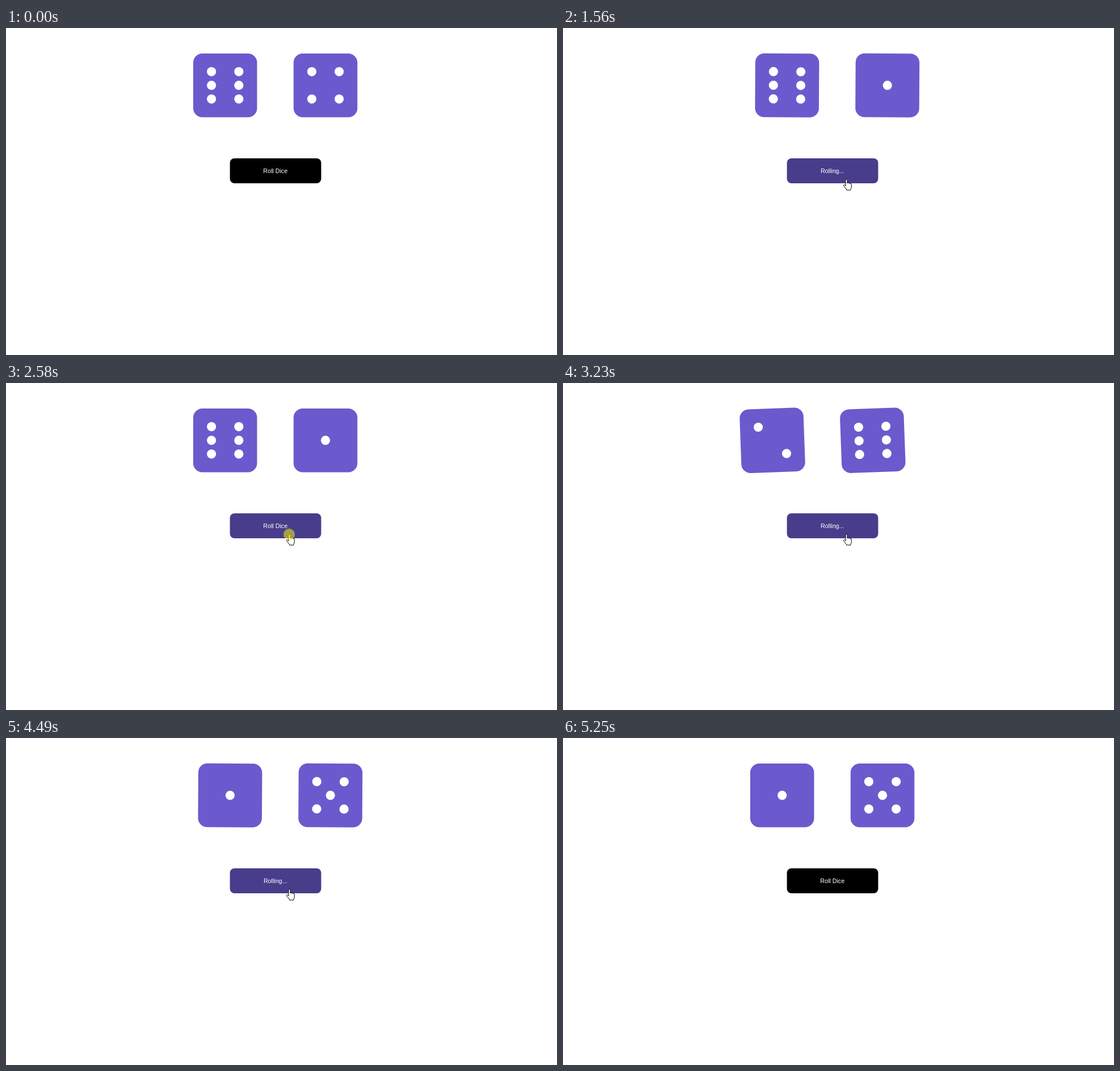
An HTML page that plays this animation: 971x577 px, repeating every 5.81 s.

```html
<!DOCTYPE html>
<html lang="en">
<head>
<meta charset="utf-8">
<title>Roll Dice</title>
<style>
  html, body { margin: 0; height: 100%; overflow: hidden; background: #fff; }
  svg { display: block; width: 971px; height: 577px; }
  text { font: 10.7px "Liberation Sans", Arial, sans-serif; fill: #fff; text-anchor: middle; }
  .die { fill: #6a5acd; }
  .pip { fill: #fff; }
  #cursor path { fill: #fff; stroke: #000; stroke-linejoin: round; }
</style>
</head>
<body>
<svg viewBox="0 0 971 577">
  <g id="dice"></g>
  <rect id="button" x="394.6" y="230" width="160.8" height="44" rx="8"/>
  <text id="label" x="474.7" y="255.7"></text>
  <g id="cursor">
    <path id="arrow" d="M0 0V16l3.7-3.6 2.6 6.1 2.3-1-2.6-6H11z"/>
    <path id="hand" d="M-1 11V1.5a1.5 1.5 0 0 1 3 0V7q0-1 1.3-1t1.3 1.2q.2-1 1.3-.8t1.2 1.3q2-.6 2.2 1.3V13q0 2.5-1.5 4.5V19H.5v-1.2L-4.5 11.5q-.6-1.8 1-1.8 1.2 0 2.5 2z"/>
  </g>
  <circle id="press" cx="499" cy="267" r="10" fill="#ff0" fill-opacity=".5"/>
</svg>
<script>
const LOOP = 5810, STEP = 65, WOBBLE = 1100, ROLL_STEPS = 12;
const CENTERS = [386.2, 563], CENTER_Y = 101.2, SLOT = 176.8, SIZE = 112.5, PIP_GAP = 24.1;

// Cells of a 3 x 3 grid that carry a pip
const FACES = { 1: [4], 2: [0, 8], 4: [0, 2, 6, 8], 5: [0, 2, 4, 6, 8], 6: [0, 2, 3, 5, 6, 8] };
const ROLLS = [
  { press: 1180, start: 1370, faces: [6, 1] },
  { press: 2580, start: 2830, faces: [2, 6] },
  { press: 4100, start: 4290, faces: [1, 5] }
];
// Progress, shift in slot widths, degrees
const KEYS = [[0, 0, 0], [.15, -.25, -5], [.3, .2, 3], [.45, -.15, -3], [.6, .1, 2], [.75, -.05, -1], [1, 0, 0]];

const $ = id => document.getElementById(id);
const show = (node, on) => node.setAttribute('visibility', on ? 'visible' : 'hidden');
const mix = (a, b, p) => a + (b - a) * p;
const stepsSince = (t, start) => Math.floor((t - start + 5) / STEP);

function add(parent, tag, attrs) {
  const node = document.createElementNS('http://www.w3.org/2000/svg', tag);
  for (const name in attrs) node.setAttribute(name, attrs[name]);
  return parent.appendChild(node);
}

const dice = CENTERS.map(() => {
  const group = add($('dice'), 'g', {});
  add(group, 'rect', { class: 'die', x: -SIZE / 2, y: -SIZE / 2, width: SIZE, height: SIZE, rx: 16 });
  const pips = Array.from({ length: 9 }, (_, i) => add(group, 'circle', {
    class: 'pip', r: 8.1, cx: (i % 3 - 1) * PIP_GAP, cy: (Math.floor(i / 3) - 1) * PIP_GAP
  }));
  return { group, pips };
});

// The CSS "ease" curve
function ease(x) {
  let low = 0, high = 1, u = .5;
  for (let i = 0; i < 20; i++) {
    if (.75 * u * (1 - u) + u ** 3 < x) low = u; else high = u;
    u = (low + high) / 2;
  }
  return .3 * u * (1 - u) ** 2 + 3 * u * u * (1 - u) + u ** 3;
}

function wobble(p) {
  const i = KEYS.findIndex(key => key[0] > p);
  const a = KEYS[i - 1], b = KEYS[i];
  const e = ease((p - a[0]) / (b[0] - a[0]));
  return [mix(a[1], b[1], e) * SLOT, mix(a[2], b[2], e)];
}

function cursorAt(t) {
  if (t < 985) {
    const p = 1 - (1 - Math.min(1, stepsSince(t, 400) / 8)) ** 2;
    return [mix(915, 505, p), mix(547, 276, p)];
  }
  if (t < 1050) return [501, 270];
  const now = 4290 + stepsSince(t, 4290) * STEP;
  const p = Math.min(1, Math.max(0, (now - 4600) / 600));
  const u = 1 - (1 - p) ** 1.4;
  const curve = (a, b, c) => mix(mix(a, b, u), mix(b, c, u), u);
  return [curve(499, 735, 965), curve(267, 262, 544)];
}

function draw(t) {
  const roll = ROLLS.filter(r => t >= r.start).pop();
  const step = roll ? stepsSince(t, roll.start) : ROLL_STEPS;
  const rolling = step < ROLL_STEPS;
  const [shift, angle] = rolling ? wobble((37 + step * 64) / WOBBLE) : [0, 0];
  const faces = roll ? roll.faces : [6, 4];

  dice.forEach(({ group, pips }, n) => {
    group.setAttribute('transform', `translate(${CENTERS[n] + shift} ${CENTER_Y}) rotate(${angle})`);
    pips.forEach((pip, i) => show(pip, FACES[faces[n]].includes(i)));
  });

  const [x, y] = cursorAt(t);
  const visible = t >= 400 && t < 5250;
  const hover = visible && x > 394.6 && x < 555.4 && y > 230 && y < 274;
  $('button').setAttribute('fill', hover ? '#483d8b' : '#000');
  $('label').textContent = rolling ? 'Rolling...' : 'Roll Dice';
  $('cursor').setAttribute('transform', `translate(${x} ${y})`);
  show($('hand'), hover);
  show($('arrow'), visible && !hover);
  show($('press'), ROLLS.some(r => t >= r.press && t < r.start));
}

const begin = performance.now();
function tick() {
  draw((performance.now() - begin) % LOOP);
  requestAnimationFrame(tick);
}
tick();
</script>
</body>
</html>
```
